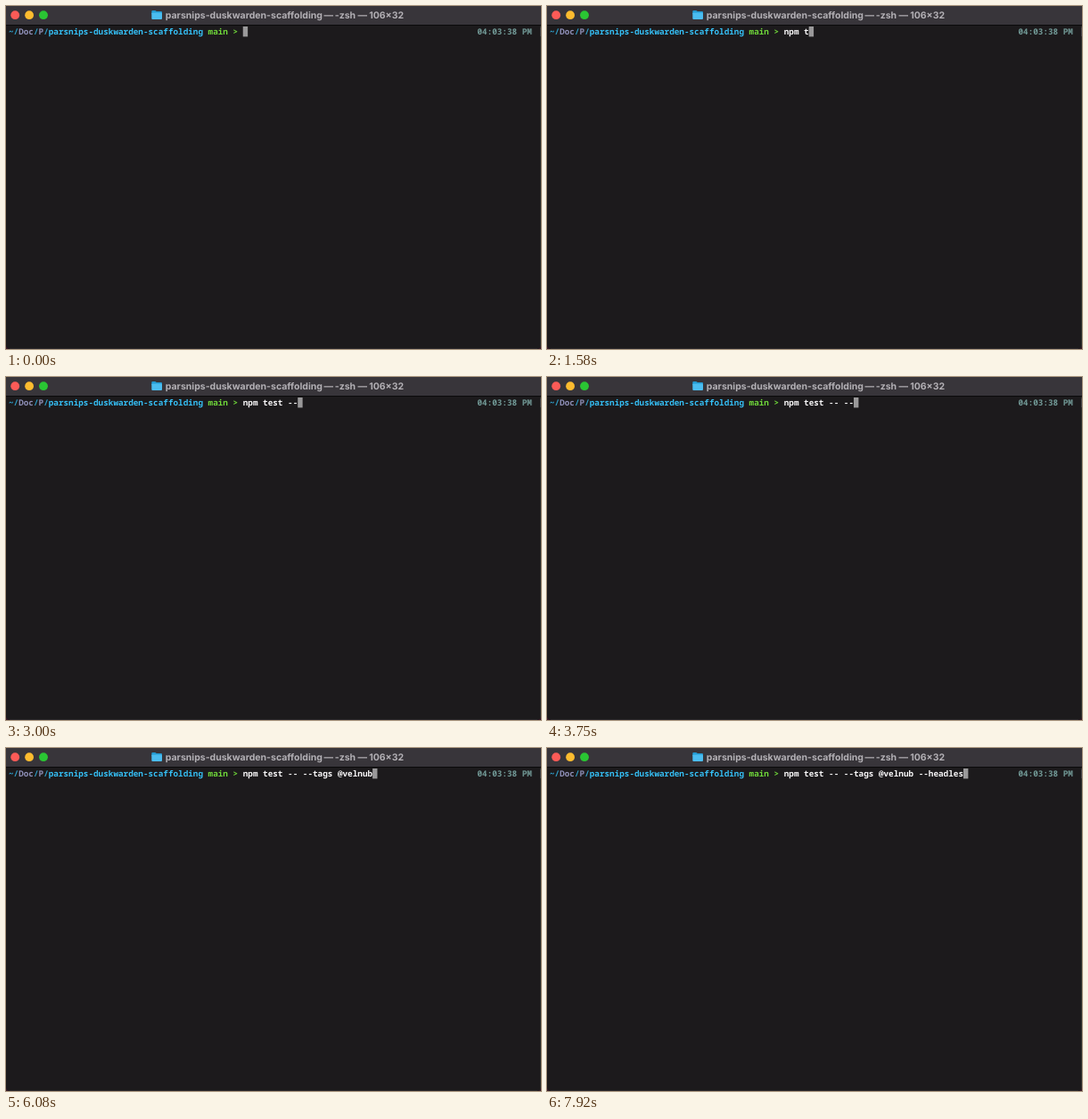
These frames come from a looping animation (600x385 px, 8 s). An HTML page:

```html
<!DOCTYPE html>
<html lang="en">
<head>
<meta charset="utf-8">
<title>Terminal</title>
<style>
  html, body { margin: 0; width: 100%; height: 100%; overflow: hidden; background: #1c1a1c; }
  svg { display: block; width: 600px; height: 385px; }
  text { white-space: pre; text-rendering: geometricPrecision; }
  .title { font: 700 10.5px Inter, sans-serif; fill: #b3b0b5; }
  .cell { font: 600 9.3px "Noto Sans Mono", "DejaVu Sans Mono", monospace; }
  .bold { font-weight: 700; }
</style>
</head>
<body>
<svg viewBox="0 0 600 385">
  <rect width="600" height="385" fill="#1c1a1c"/>
  <rect width="600" height="21" fill="#38353a"/>
  <rect y="21" width="600" height="1" fill="#0b0a0b"/>
  <path d="M599.5 22V385" stroke="#30312e"/>
  <path d="M599.5 24V34" stroke="#4a494a"/>
  <path d="M0 380Q0 385 5 385H0ZM600 380Q600 385 595 385H600Z" fill="#3b1a29"/>
  <path d="M4 384.7H596" stroke="#39343a" stroke-width=".6"/>

  <circle cx="10.2" cy="10.2" r="4.9" fill="#fc5b57"/>
  <circle cx="26.1" cy="10.2" r="4.9" fill="#fdbc2f"/>
  <circle cx="42" cy="10.2" r="4.9" fill="#2ac533"/>

  <path d="M163.3 6Q163.3 5 164.3 5H167.4L168.8 6.1H174Q175 6.1 175 7.1V9H163.3Z" fill="#249bd2"/>
  <rect x="163.3" y="7.4" width="11.7" height="7.6" rx="1" fill="#4bbdf0"/>

  <text class="title" y="13.8"><tspan id="name" x="178.8"></tspan><tspan x="356.6">—</tspan><tspan x="368.8">-zsh</tspan><tspan x="394.6">—</tspan><tspan x="407.2">106×32</tspan></text>

  <g id="line"></g>
  <rect id="cursor" y="23" width="5.4" height="11.4" fill="#9a999a"/>
</svg>
<script>
const LOOP = 8000, LEFT = 3, CELL = 5.59, START = 47;
const project = "parsnips-duskwarden-scaffolding";
const command = "npm test -- --tags @velnub --headless";

// Typing pace: [ms, characters typed]
const pace = [[0, 0], [600, 0], [1000, 2.4], [2330, 9.5], [3750, 14.5],
              [5080, 22.5], [6080, 26.5], [7920, 36.5], [8000, 36.9]];

const $ = id => document.getElementById(id);
const colX = col => LEFT + col * CELL;

function addText(col, str, fill, bold) {
  const el = document.createElementNS("http://www.w3.org/2000/svg", "text");
  el.setAttribute("class", bold ? "cell bold" : "cell");
  el.setAttribute("x", [...str].map((_, i) => colX(col + i).toFixed(2)).join(" "));
  el.setAttribute("y", 32);
  el.setAttribute("fill", fill);
  el.textContent = str;
  $("line").append(el);
  return el;
}

function typedAt(ms) {
  const i = Math.max(1, pace.findIndex(p => p[0] >= ms));
  const [t0, n0] = pace[i - 1], [t1, n1] = pace[i];
  return Math.floor(n0 + (n1 - n0) * (ms - t0) / (t1 - t0));
}

$("name").textContent = project;
addText(0, "~", "#35bff5", true);
for (const col of [1, 5, 7]) addText(col, "/", "#2f9fca");
addText(2, "Doc", "#8f90b8");
addText(6, "P", "#8f90b8");
addText(8, project, "#35bff5", true);
addText(40, "main", "#6fd63a");
addText(45, ">", "#6fd63a", true);
addText(94, "04:03:38 PM", "#729a97");
const typed = addText(START, command, "#f8f7f8");

function draw(ms) {
  const step = Math.floor((ms % LOOP + 4) * 0.012);
  const count = typedAt(Math.min(LOOP, step * 1000 / 12));
  typed.textContent = command.slice(0, count);
  $("cursor").setAttribute("x", colX(START + count).toFixed(2));
}

const begin = performance.now();
function tick() {
  draw(performance.now() - begin);
  requestAnimationFrame(tick);
}
tick();
</script>
</body>
</html>
```
